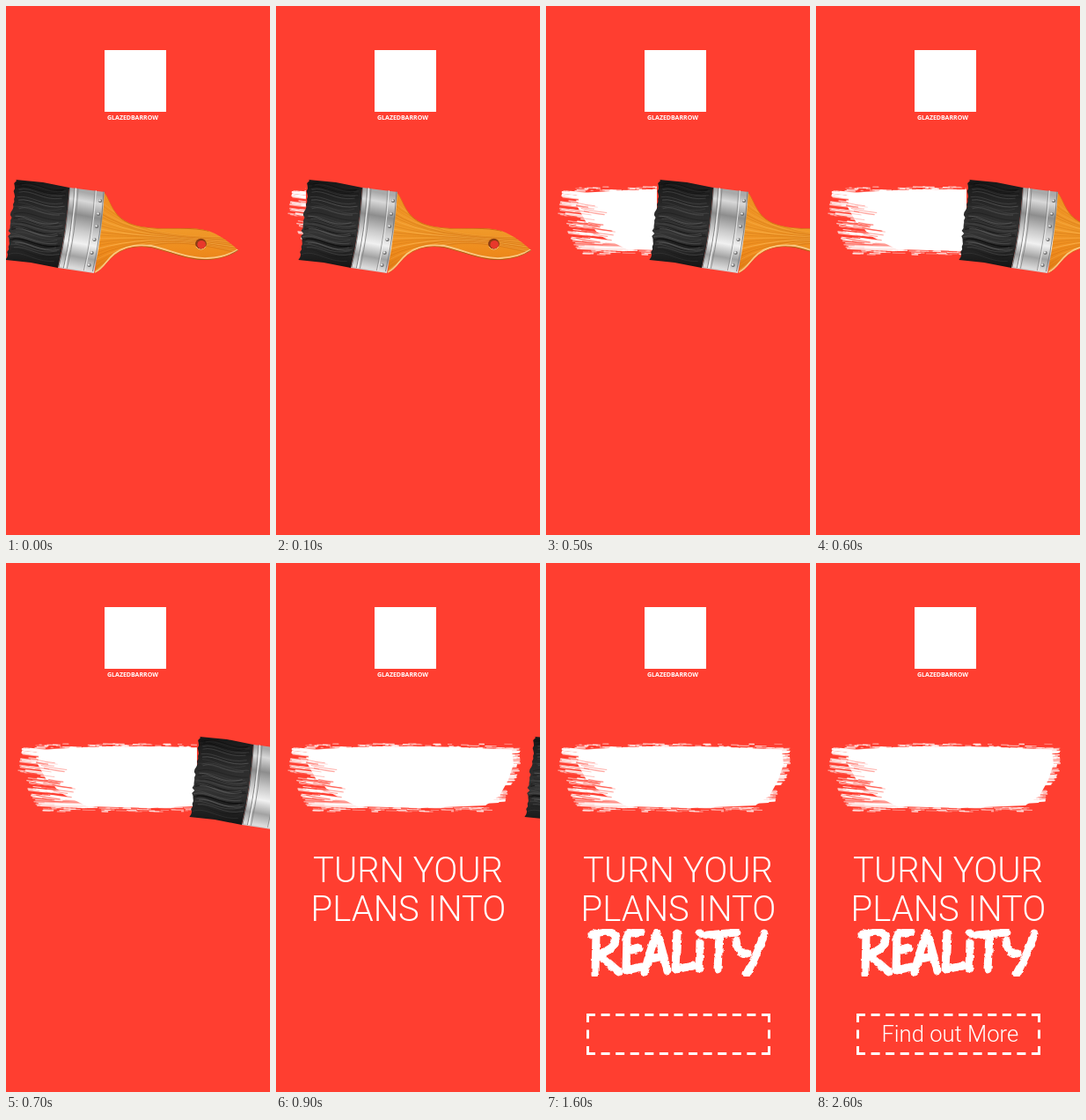
Animation, 300 px wide and 600 px high, one loop 3600 ms. Source, as an HTML page:

```html
<!DOCTYPE html>
<html lang="en">
<head>
<meta charset="utf-8">
<title>Paint banner</title>
<style>
html, body { margin: 0; width: 100%; height: 100%; overflow: hidden; background: #ff3e30; }
svg { display: block; width: 100vw; height: 100vh; }
text { fill: #fff; text-anchor: middle; }
.thin { font: 300 40px Roboto, sans-serif; }
.button { font: 300 25.6px Roboto, sans-serif; }
.name { font: 700 7px "Open Sans", sans-serif; }
.line { fill: none; stroke-linecap: round; stroke-linejoin: round; }
</style>
</head>
<body>
<svg viewBox="0 0 300 600" xmlns="http://www.w3.org/2000/svg">
  <defs>
    <linearGradient id="metal" x1="0" y1="0" x2="-.1" y2="1">
      <stop offset="0" stop-color="#a9a9a9"/><stop offset=".1" stop-color="#d8d8d8"/>
      <stop offset=".27" stop-color="#8d8d8d"/><stop offset=".45" stop-color="#c9c9c9"/>
      <stop offset=".6" stop-color="#f1f1f1"/><stop offset=".76" stop-color="#a2a2a2"/>
      <stop offset=".9" stop-color="#dedede"/><stop offset="1" stop-color="#777"/>
    </linearGradient>
    <linearGradient id="hair" x1="0" y1="0" x2="0" y2="1">
      <stop offset="0" stop-color="#181818"/><stop offset=".35" stop-color="#2b2b2b"/>
      <stop offset=".6" stop-color="#343434"/><stop offset="1" stop-color="#151515"/>
    </linearGradient>
    <linearGradient id="wood" x1="0" y1="0" x2="0" y2="1">
      <stop offset="0" stop-color="#ee8e20"/><stop offset=".45" stop-color="#f09a2a"/>
      <stop offset=".75" stop-color="#ee8a1c"/><stop offset="1" stop-color="#dc7a16"/>
    </linearGradient>
    <clipPath id="handleClip"><use href="#handleShape"/></clipPath>
    <clipPath id="reveal"><rect id="wipe" y="195" height="100"/></clipPath>
    <filter id="soft"><feGaussianBlur stdDeviation=".45"/></filter>
    <filter id="rough" x="-5%" y="-5%" width="110%" height="110%">
      <feTurbulence type="fractalNoise" baseFrequency=".16" numOctaves="2" seed="4"/>
      <feDisplacementMap in="SourceGraphic" scale="4" xChannelSelector="R" yChannelSelector="G"/>
    </filter>
  </defs>

  <rect width="300" height="600" fill="#ff3e30"/>
  <rect x="112" y="50" width="70" height="70" fill="#fff"/>
  <text class="name" x="144" y="129">GLAZEDBARROW</text>

  <g clip-path="url(#reveal)"><g id="paint" class="line" filter="url(#soft)"></g></g>

  <g id="brush">
    <path id="handleShape" d="M111 211C117 217 119 228 127 237C137 248 152 251 172 252C192 253 212 250 230 255C244 260 255 269 264 277C256 283 243 287 229 288C207 289 188 279 165 274C148 271 134 274 123 283C114 290 110 299 101 303Z" fill="url(#wood)"/>
    <g id="grain" class="line" clip-path="url(#handleClip)"></g>
    <circle cx="221.5" cy="270" r="6.3" fill="#8a3b12"/>
    <circle cx="222.2" cy="270.7" r="4.8" fill="#e8382b"/>
    <path class="line" d="M216 273A6.3 6.3 0 0 0 227 273" stroke="#f8c273" stroke-width="1"/>
    <path d="M72 206L112 211Q109 260 100 303L59 297Q69 255 72 206Z" fill="url(#metal)"/>
    <g id="bands" class="line"></g>
    <g id="bristles" class="line"></g>
  </g>

  <g id="headline">
    <text class="thin" x="150" y="362">TURN YOUR</text>
    <text class="thin" x="150.5" y="405.5">PLANS INTO</text>
  </g>
  <g id="reality" class="line" role="img" aria-label="REALITY" stroke="#fff" stroke-width="9" filter="url(#rough)">
    <path d="M57 421L56 466M52 422C66 416 81 417 79 428C78 437 67 441 60 444L83 464"/>
    <path d="M92 421L91 462M92 421L108 418M92 440L106 437M91 462L109 458"/>
    <path d="M112 464C116 449 120 433 126 420C131 433 134 448 138 463M117 449L134 446"/>
    <path d="M149 420L147 461L167 457"/>
    <path d="M175 430L174 460M175 420L176 420"/>
    <path d="M183 422L217 419M197 422L195 461"/>
    <path d="M216 428C217 438 222 444 229 443M248 420C243 437 235 453 228 466"/>
  </g>
  <g id="box" stroke="#fff" stroke-width="3">
    <path d="M46 512.5H255M46 556.5H255" stroke-dasharray="10 6.58"/>
    <path d="M47.5 511V558M253.5 511V558" stroke-dasharray="10 8.5"/>
  </g>
  <text id="more" class="button" x="152.3" y="543">Find out More</text>
</svg>
<script>
const $ = id => document.getElementById(id);

let seed = 17;
const rand = (a, b) => {
  seed = (seed * 16807) % 2147483647;
  return a + (b - a) * seed / 2147483647;
};
const mix = (a, b, t) => a + (b - a) * t;

function add(parent, d, stroke, width, opacity = 1, fill = "none") {
  const p = document.createElementNS("http://www.w3.org/2000/svg", "path");
  const attrs = { d, stroke, "stroke-width": width, opacity, fill };
  for (const k in attrs) p.setAttribute(k, attrs[k]);
  $(parent).append(p);
}

function streak(x, y, len, slope, color, width, opacity) {
  add("paint", `M${x} ${y}q${len / 2} ${len * slope * .7} ${len} ${len * slope}`, color, width, opacity);
}

function buildPaint() {
  const white = "#fff", red = "#ff3e30";
  const left = y => y < 235 ? mix(19, 14, (y - 210) / 25) : mix(14, 37, (y - 235) / 46);
  const right = y => y < 235 ? 277 : 277 - (y - 235) * .45;
  add("paint", "M38 212Q95 208 150 208T268 212L270 228L264 246L254 264L238 275L165 278L92 276L66 263L46 246L36 228Z", "none", 0, 1, white);
  for (let i = 0; i < 80; i++) {
    const y = rand(210, 276), x = left(y) + rand(0, 1) ** 2 * 25;
    streak(x, y, rand(25, 62), y < 265 ? .1 : .03, white, rand(.6, 2.3), rand(.45, 1));
  }
  for (let i = 0; i < 34; i++) {
    const y = rand(222, 270);
    streak(left(y) + rand(3, 32), y, rand(8, 32), .17, red, rand(.4, 1.4), rand(.3, .85));
  }
  for (let i = 0; i < 65; i++) {
    const y = rand(211, 274), len = rand(12, 35);
    streak(right(y) - len - rand(0, 1) ** 2 * 12, y, len, -.06, white, rand(.7, 2.4), rand(.5, 1));
  }
  for (let i = 0; i < 95; i++) {
    const x = rand(28, 262), up = rand(0, 1) ** 2 * 5;
    streak(x, 210 - up, rand(2, 13), .02, white, rand(.5, 1.6), rand(.35, .95));
    if (i < 75) streak(rand(38, 240), 277 + up, rand(2, 14), .02, white, rand(.5, 1.5), rand(.3, .9));
  }
}

function buildBrush() {
  for (let i = 0; i < 24; i++) {
    const y = 216 + i * 4;
    add("grain", `M102 ${y}Q130 ${mix(y, 262, .6)} 165 ${mix(y, 263, .8)}T262 ${mix(y, 273, .8)}`,
      i % 3 ? "#c96a0e" : "#ffc166", rand(.5, 1.2), rand(.25, .55));
  }
  add("grain", "M101 302C112 297 113 289 123 281C135 272 149 270 165 272C188 277 207 287 229 286Q250 285 264 276", "#ffd79a", 1.8, .8);
  add("grain", "M101 304C112 299 114 291 124 283C135 274 149 272 165 274C188 279 207 289 229 288Q250 287 264 277", "#8e4b12", 1.4, .8);
  add("grain", "M112 211C117 217 119 228 127 237C137 248 152 251 172 252C192 253 212 250 230 255", "#c65f0d", 1.3, .8);

  const band = (dx, color, w) => add("bands", `M${72 + dx} ${206 + dx * .12}Q${69 + dx} ${255 + dx * .12} ${59.5 + dx} ${296 + dx * .12}`, color, w, .85);
  band(.5, "#666", 1);
  band(6, "#777", 1);
  band(7.3, "#fff", 1.2);
  band(10, "#808080", 1);
  band(29, "#858585", .9);
  band(30.3, "#eee", 1);
  band(39, "#777", 1);
  [[107, 221], [105, 236], [103, 250], [100.5, 265], [97.5, 280], [94.5, 294]].forEach(([x, y]) => {
    add("bands", `M${x} ${y}h.1`, "#6e6e6e", 4.2);
    add("bands", `M${x - .5} ${y - .6}h.1`, "#e9e9e9", 2.4);
  });

  let edge = "";
  for (let i = 0; i <= 30; i++) {
    const t = i / 30;
    edge += `L${mix(11, 0, t ** .75) + rand(-1, 2.5)} ${mix(198, 288, t)}`;
  }
  add("bristles", `M72 206L42 200L11 197${edge}L28 291L59 297Q69 255 72 206Z`, "none", 0, 1, "url(#hair)");
  for (let i = 0; i < 46; i++) {
    const t = rand(.02, .98), x = mix(11, 1, t) + rand(-1, 8), y = mix(199, 287, t);
    const ex = mix(71, 60, t) - rand(0, 8), ey = mix(206, 295, t), w = rand(-3, 3);
    add("bristles", `M${x} ${y}C${mix(x, ex, .3)} ${y - 3 + w} ${mix(x, ex, .55)} ${ey + 4 + w} ${ex} ${ey}`,
      i % 3 ? "#6a6a6a" : "#060606", rand(.4, 1.3), rand(.25, .65));
  }
}

const LOOP = 3600, STEP = 100;
const travel = [0, 26, 52, 77.5, 98, 118, 163, 209, 246, 283];
const show = (id, on) => $(id).setAttribute("visibility", on ? "visible" : "hidden");

function draw(ms) {
  const t = ms % LOOP;
  const x = travel[Math.min(Math.floor(t / STEP), travel.length - 1)];
  $("brush").setAttribute("transform", `translate(${x} 0)`);
  $("wipe").setAttribute("width", x + 8);
  show("brush", t < 1100);
  show("headline", t >= 900);
  show("reality", t >= 1100);
  show("box", t >= 1600);
  show("more", t >= 2600);
}

buildPaint();
buildBrush();
const start = performance.now();
function tick() {
  draw(performance.now() - start);
  requestAnimationFrame(tick);
}
tick();
</script>
</body>
</html>
```
